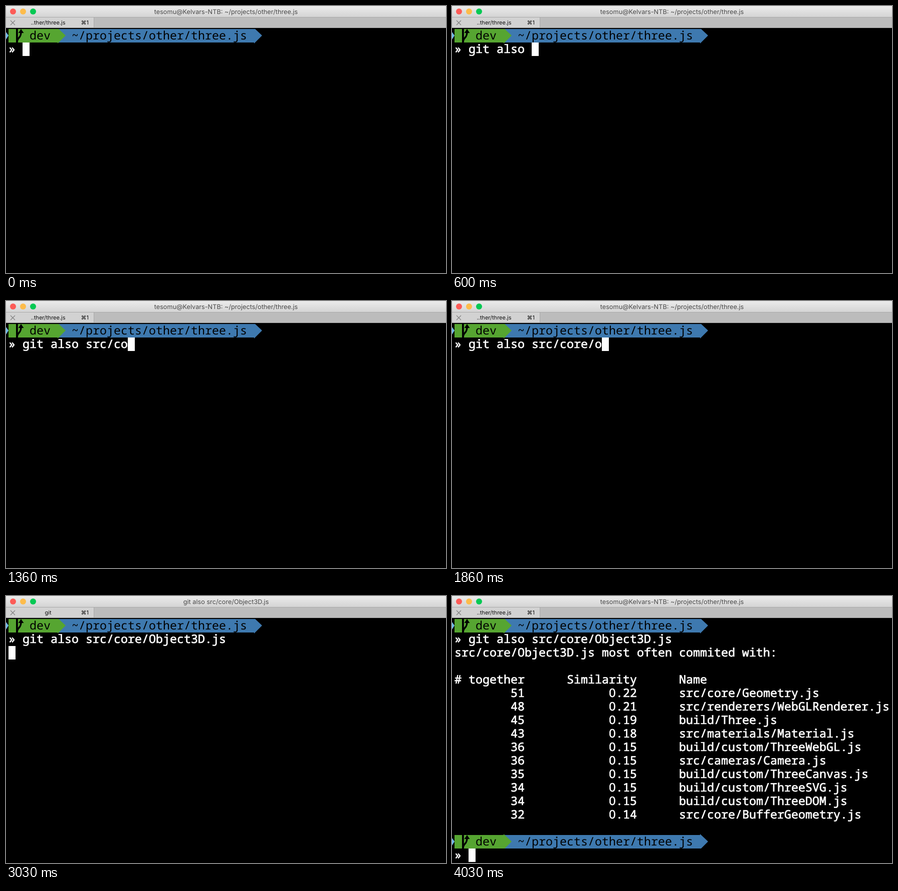
An HTML page that plays this animation: 878 by 534 pixels, repeating every 8 s.

```html
<!DOCTYPE html>
<html lang="en">
<head>
<meta charset="utf-8">
<title>Terminal</title>
<style>
  html, body { margin: 0; width: 100%; height: 100%; overflow: hidden; background: #000; }
  svg { display: block; width: 878px; height: 534px; }
  text { text-rendering: geometricPrecision; white-space: pre; }
  .ui { font: 11px Inter, Roboto, sans-serif; fill: #111; }
  .title { font-size: 12.72px; fill: #4a4a4a; }
  .mid { text-anchor: middle; }
  .mono { font: 23.333px "Noto Sans Mono", "DejaVu Sans Mono", monospace; }
  .out { fill: #fff; stroke: #fff; stroke-width: .7px; }
  .zero { font-family: "Open Sans", "Noto Sans", sans-serif; text-anchor: middle; }
</style>
</head>
<body>
<svg viewBox="0 0 878 534" xmlns="http://www.w3.org/2000/svg">
  <defs>
    <linearGradient id="bar" x2="0" y2="1">
      <stop stop-color="#ebebeb"/>
      <stop offset="1" stop-color="#d4d4d4"/>
    </linearGradient>
    <clipPath id="clipTop"><rect y="46" width="878" height="30"/></clipPath>
    <clipPath id="clipEnd"><rect y="474" width="878" height="31"/></clipPath>
    <g id="prompt">
      <path fill="#76bdec" d="M0 6 5 13 0 21z"/>
      <path fill="#3e79af" d="M103 0H495V-2L511 13 495 29V27H103z"/>
      <path fill="#56a531" d="M5 0H103V-2L119 13 103 29V27H5z"/>
      <path d="M20 0h3.8v27H20zM24.5 8 30 0l5.5 8z"/>
      <path fill="none" stroke="#000" stroke-width="3.4" d="M22 26C22 16 30 20 30 6"/>
      <text class="mono" x="47" y="21">dev</text>
      <text class="mono" x="131" y="21">~/projects/other/three.js</text>
    </g>
  </defs>

  <rect width="878" height="534"/>
  <rect width="878" height="22" fill="url(#bar)"/>
  <rect y="22" width="878" height="22" fill="#bcbcbc"/>
  <rect y="22" width="175" height="22" fill="#d2d2d2"/>
  <path fill="#a9a9a9" d="M0 22h878v1H0zM175 22h1v22h-1zM0 43h878v1H0z"/>
  <circle cx="14" cy="11" r="6" fill="#fc5b57"/>
  <circle cx="34" cy="11" r="6" fill="#fdbc4b"/>
  <circle cx="54" cy="11" r="6" fill="#05c953"/>
  <path stroke="#808080" stroke-width="1.2" d="M9 29l9 9M18 29l-9 9"/>
  <text id="title" class="ui title mid" x="439" y="16"></text>
  <text id="tab" class="ui mid" x="84" y="37"></text>
  <text class="ui" x="165" y="37" text-anchor="end">⌘1</text>

  <g clip-path="url(#clipTop)"><use href="#prompt" y="46"/></g>
  <g id="shell"></g>
  <g id="result">
    <g clip-path="url(#clipEnd)"><use href="#prompt" y="478"/></g>
  </g>
  <rect id="cursor" width="14" height="27" fill="#fff"/>
</svg>
<script>
  const LOOP = 8000, CELL = 14, LINE = 27, LEFT = 5, TOP = 46, BASE = 21;
  const $ = id => document.getElementById(id);
  const colX = col => LEFT + col * CELL;
  const rowY = row => TOP + row * LINE;

  function write(parent, col, row, str, extra = "") {
    const el = document.createElementNS("http://www.w3.org/2000/svg", "text");
    el.setAttribute("class", "mono out " + extra);
    el.setAttribute("x", colX(col));
    el.setAttribute("y", rowY(row) + BASE);
    el.textContent = str;
    parent.append(el);
    return el;
  }

  const shell = $("shell"), result = $("result"), cursor = $("cursor");
  write(shell, 0, 1, "»");
  const command = write(shell, 2, 1, "");

  write(result, 0, 2, "src/core/Object3D.js most often commited with:");
  write(result, 0, 4, "# together");
  write(result, 16, 4, "Similarity");
  write(result, 32, 4, "Name");
  [
    [51, 22, "src/core/Geometry.js"],
    [48, 21, "src/renderers/WebGLRenderer.js"],
    [45, 19, "build/Three.js"],
    [43, 18, "src/materials/Material.js"],
    [36, 15, "build/custom/ThreeWebGL.js"],
    [36, 15, "src/cameras/Camera.js"],
    [35, 15, "build/custom/ThreeCanvas.js"],
    [34, 15, "build/custom/ThreeSVG.js"],
    [34, 15, "build/custom/ThreeDOM.js"],
    [32, 14, "src/core/BufferGeometry.js"]
  ].forEach(([count, percent, name], i) => {
    const row = 5 + i;
    write(result, 8, row, count);
    write(result, 22.5, row, "0", "zero"); // plain zero, without a slash
    write(result, 23, row, "." + percent);
    write(result, 32, row, name);
  });
  write(result, 0, 17, "»");

  const LINE_TEXT = "git also src/core/Object3D.js ";
  // [time, characters visible]
  const typing = [
    [0, 0], [60, 1], [130, 2], [210, 3], [290, 5], [370, 6], [450, 7], [530, 8], [600, 9],
    [760, 10], [860, 11], [960, 12],
    [1130, 13], [1250, 14], [1360, 15], [1460, 16], [1500, 17],
    [1730, 18], [1860, 19], [2200, 19], [2280, 29], [2360, 30]
  ];
  const ENTER = 2930, TAB_ON = 2960, TITLE_ON = 3030;
  const TAB_OFF = 3930, OUTPUT = 3960, TITLE_OFF = 4030;

  function draw(t) {
    const within = (from, to) => t >= from && t < to;
    const count = typing.filter(step => step[0] <= t).pop()[1];
    let str = LINE_TEXT.slice(0, count);
    if (within(1860, 2200)) str = str.slice(0, -1) + "o";
    command.textContent = str;

    const done = t >= OUTPUT;
    const [col, row] = done ? [2, 17] : t >= ENTER ? [0, 2] : [2 + count, 1];
    cursor.setAttribute("x", colX(col));
    cursor.setAttribute("y", rowY(row));
    result.style.display = done ? "" : "none";

    $("tab").textContent = within(TAB_ON, TAB_OFF) ? "git" : "..ther/three.js";
    $("title").textContent = within(TITLE_ON, TITLE_OFF)
      ? LINE_TEXT.trim()
      : "tesomu@Kelvars-NTB: ~/projects/other/three.js";
  }

  const start = performance.now();
  function tick() {
    draw((performance.now() - start) % LOOP);
    requestAnimationFrame(tick);
  }
  tick();
</script>
</body>
</html>
```
